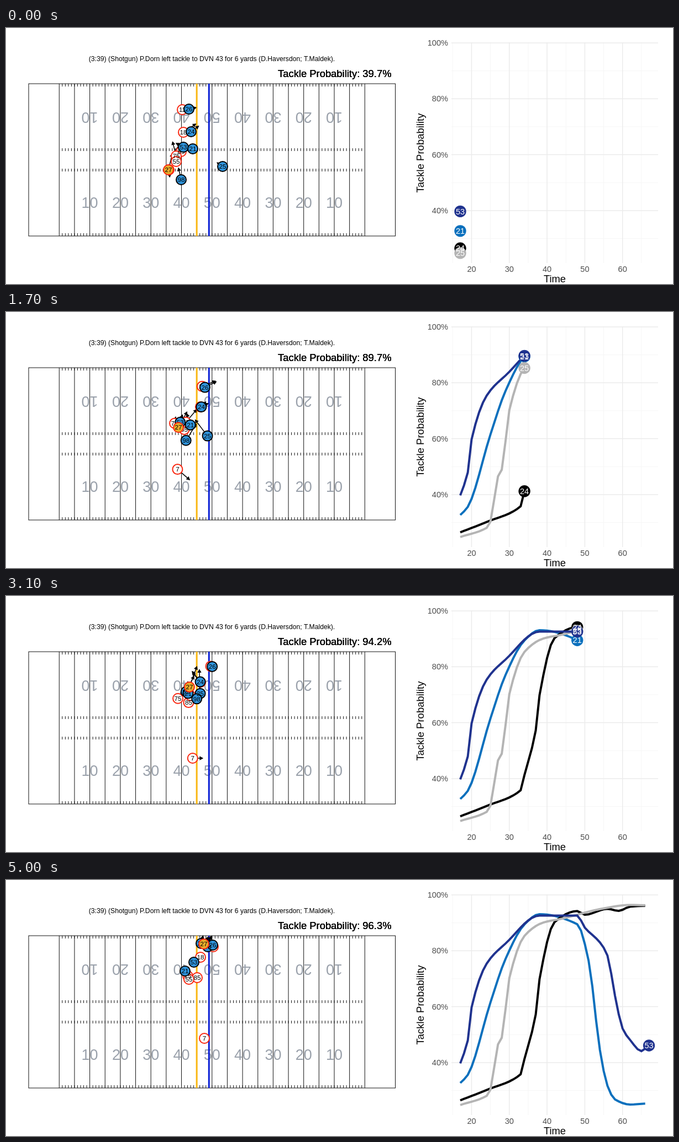
An HTML page with a canvas that plays this animation: 1207x464 px, repeating every 5.1 s.

```html
<!DOCTYPE html>
<html lang="en">
<head>
<meta charset="utf-8">
<title>Tackle probability</title>
<style>
html, body { margin: 0; width: 100%; height: 100%; overflow: hidden; background: #fff; }
canvas { display: block; width: 1207px; height: 464px; }
</style>
</head>
<body>
<canvas id="stage" width="1207" height="464"></canvas>
<script>
const ctx = document.getElementById('stage').getContext('2d');
const STEP = 100, STEPS = 51, FIRST = 17;

// Smooth curve through [time, value] keys without overshoot, easing out at the end
function curve(keys) {
  const last = keys.length - 1;
  const slope = i => (keys[i + 1][1] - keys[i][1]) / (keys[i + 1][0] - keys[i][0]);
  const tangent = i => {
    const a = slope(Math.max(i - 1, 0)), b = i < last ? slope(i) : a / 3;
    return a * b > 0 ? 2 * a * b / (a + b) : 0;
  };
  return t => {
    if (t >= keys[last][0]) return keys[last][1];
    let k = 0;
    while (t >= keys[k + 1][0]) k++;
    const [t0, a] = keys[k], [t1, b] = keys[k + 1];
    const u = (t - t0) / (t1 - t0);
    return a + (b - a) * u * u * (3 - 2 * u) +
      (t1 - t0) * u * (1 - u) * (tangent(k) * (1 - u) - tangent(k + 1) * u);
  };
}

// Tackle probability in percent at a few times
const makeSeries = (label, color, ...keys) => ({ label, color, end: keys.at(-1)[0], at: curve(keys) });
const series = [
  makeSeries('21', '#0b70bd', [17, 32.7], [19, 35.6], [25, 61.5], [29, 77.1], [34, 89.4], [38, 93.1],
    [48, 89.5], [51, 76.5], [54, 44.5], [56, 31.7], [58, 26.8], [62, 25], [66, 25.3]),
  makeSeries('24', '#000', [17, 26.5], [24, 30.2], [33, 35.8], [34, 41.2], [37, 57.2], [38, 69.8],
    [42, 90.3], [48, 94.2], [50, 92.9], [56, 95], [59, 94.3], [62, 95.8], [66, 96.1]),
  makeSeries('25', '#b4b4b4', [17, 24.8], [24, 28.1], [25, 30.3], [27, 46.5], [28, 48.9], [30, 70.2],
    [34, 85.3], [39, 90.1], [44, 91.5], [54, 94.9], [62, 96.4], [66, 96.3]),
  makeSeries('53', '#20338f', [17, 39.7], [19, 47.9], [20, 59.7], [24, 75.4], [29, 82.6], [38, 92.6],
    [48, 92.6], [50, 88.3], [54, 83], [56, 78.3], [58, 63.9], [60, 52.2], [62, 48.1], [65, 44.1], [67, 46.1])
];

// Player paths through one point per key step
const KEYS = [0, 7, 25, 37, 50];
function makePlayer(label, ...points) {
  const [x, y] = [0, 1].map(axis => curve(KEYS.map((k, i) => [k, points[i][axis]])));
  return { label, x, y };
}
const offense = [
  makePlayer('11', [319, 148], [331, 144], [368, 129], [372, 126], [375, 121]),
  makePlayer('18', [321, 189], [336, 179], [358, 166], [346, 147], [352, 140]),
  makePlayer('85', [317, 224], [320, 224], [325, 200], [337, 187], [346, 177]),
  makePlayer('75', [308, 232], [304, 215], [307, 193], [317, 180], [329, 174]),
  makePlayer('55', [308, 242], [310, 224], [335, 186], [332, 178], [331, 180]),
  makePlayer('7', [295, 257], [296, 266], [327, 294], [347, 294], [359, 287])
];
const defense = [
  makePlayer('24', [335, 188], [344, 181], [357, 164], [346, 145], [353, 115]),
  makePlayer('25', [392, 251], [385, 246], [353, 200], [351, 153], [364, 118]),
  makePlayer('53', [321, 216], [313, 211], [319, 188], [333, 160], [340, 149]),
  makePlayer('21', [338, 219], [338, 218], [330, 189], [329, 168], [324, 165]),
  makePlayer('98', [317, 275], [314, 260], [339, 208], [351, 164], [365, 121]),
  makePlayer('26', [331, 147], [340, 145], [371, 130], [374, 126], [374, 118])
];
const carrier = [makePlayer('27', [294, 257], [299, 237], [324, 186], [340, 145], [358, 116])];

function line(x1, y1, x2, y2, color = '#111', width = 1) {
  ctx.strokeStyle = color;
  ctx.lineWidth = width;
  ctx.beginPath();
  ctx.moveTo(x1, y1);
  ctx.lineTo(x2, y2);
  ctx.stroke();
}

function text(str, x, y, size, color = '#000', align = 'center', angle = 0) {
  ctx.save();
  ctx.translate(x, y);
  ctx.rotate(angle);
  ctx.font = `${size}px "Liberation Sans", Arial, sans-serif`;
  ctx.fillStyle = color;
  ctx.textAlign = align;
  ctx.fillText(str, 0, size * 0.355);
  ctx.restore();
}

function disc(x, y, r, fill, stroke) {
  ctx.beginPath();
  ctx.arc(x, y, r, 0, 7);
  ctx.fillStyle = fill;
  ctx.fill();
  if (!stroke) return;
  ctx.strokeStyle = stroke;
  ctx.lineWidth = 2;
  ctx.stroke();
}

const yardX = yard => 41 + yard * 5.53;
const timeX = t => 842.5 + (t - 20) * 6.83;
const percentY = p => 27 + (100 - p) * 5.065;

function drawField() {
  for (let yard = 11; yard < 110; yard++) {
    const x = yardX(yard);
    for (const y of [101, 218, 255, 372]) line(x, y, x, y + 5);
  }
  for (let yard = 10; yard <= 110; yard += 5) line(yardX(yard), 101, yardX(yard), 377);
  ctx.strokeRect(41, 101, 663.5, 276);
  for (let i = 1; i < 10; i++) {
    const mark = 50 - Math.abs(5 - i) * 10, x = yardX(10 + i * 10);
    text(mark, x, 316.5, 27, '#9aa1ab');
    text(mark, x, 163, 27, '#9aa1ab', 'center', Math.PI);
  }
  line(yardX(55), 101, yardX(55), 377, '#f9b612', 3);
  line(yardX(59), 101, yardX(59), 377, '#0a1fd6', 3);
  text('(3:39) (Shotgun) P.Dorn left tackle to DVN 43 for 6 yards (D.Haversdon; T.Maldek).', 372.5, 56, 12.2);
}

// The arrow reaches to where the player would be one second later
function drawArrow(player, n) {
  const from = Math.max(n - 1, 0), to = Math.min(n + 1, STEPS - 1);
  const speed = axis => (axis(to) - axis(from)) / (to - from) * 1000 / STEP;
  const x = player.x(n), y = player.y(n), vx = speed(player.x), vy = speed(player.y);
  const tipX = x + vx, tipY = y + vy, dir = Math.atan2(vy, vx);
  line(x, y, tipX, tipY, '#000', 1.5);
  ctx.beginPath();
  ctx.moveTo(tipX, tipY);
  for (const side of [-0.5, 0.5]) {
    ctx.lineTo(tipX - 5 * Math.cos(dir + side), tipY - 5 * Math.sin(dir + side));
  }
  ctx.closePath();
  ctx.fillStyle = '#000';
  ctx.fill();
  ctx.stroke();
}

function drawTeam(team, n, fill, stroke) {
  team.forEach(p => disc(p.x(n), p.y(n), 9, fill, stroke));
  team.forEach(p => text(p.label, p.x(n), p.y(n), 11.7));
}

function drawPlayers(n) {
  [...offense, ...defense, ...carrier].forEach(p => drawArrow(p, n));
  drawTeam(offense, n, '#fff', '#f9260f');
  drawTeam(defense, n, '#2f95dd', '#000');
  drawTeam(carrier, n, '#e9ac2b', '#f9260f');
}

function drawGrid() {
  for (let t = 15; t <= 65; t += 10) line(timeX(t), 26, timeX(t), 426, '#f6f6f6');
  for (let p = 30; p <= 90; p += 20) line(806, percentY(p), 1180, percentY(p), '#f6f6f6');
  for (let t = 20; t <= 60; t += 10) {
    line(timeX(t), 26, timeX(t), 426, '#ebebeb', 1.5);
    text(t, timeX(t), 436.5, 14.6, '#4d4d4d');
  }
  for (let p = 40; p <= 100; p += 20) {
    line(806, percentY(p), 1180, percentY(p), '#ebebeb', 1.5);
    text(p + '%', 800, percentY(p), 14.6, '#4d4d4d', 'right');
  }
  text('Time', 993, 454, 18.4);
  text('Tackle Probability', 749.5, 226.5, 18.5, '#000', 'center', -Math.PI / 2);
}

function drawChart(now) {
  ctx.lineWidth = 4;
  for (const { color, end, at } of series) {
    ctx.strokeStyle = color;
    ctx.beginPath();
    for (let t = FIRST; t <= Math.min(now, end); t++) ctx.lineTo(timeX(t), percentY(at(t)));
    ctx.stroke();
  }
  const active = series.filter(s => now <= s.end);
  active.forEach(s => disc(timeX(now), percentY(s.at(now)), 10.7, s.color));
  active.forEach(s => text(s.label, timeX(now), percentY(s.at(now)), 14.6, '#fff'));

  // Overprinting gives the heading its heavier weight
  const best = Math.max(...series.map(s => s.at(now))).toFixed(1);
  for (let i = 0; i < 3; i++) text(`Tackle Probability: ${best}%`, 697.5, 82.5, 18.4, '#000', 'right');
}

let shown = -1;
function tick(now) {
  const n = Math.floor(now / STEP) % STEPS;
  if (n !== shown) {
    shown = n;
    ctx.fillStyle = '#fff';
    ctx.fillRect(0, 0, 1207, 464);
    drawField();
    drawPlayers(n);
    drawGrid();
    drawChart(FIRST + n);
  }
  requestAnimationFrame(tick);
}
tick(0);
</script>
</body>
</html>
```
